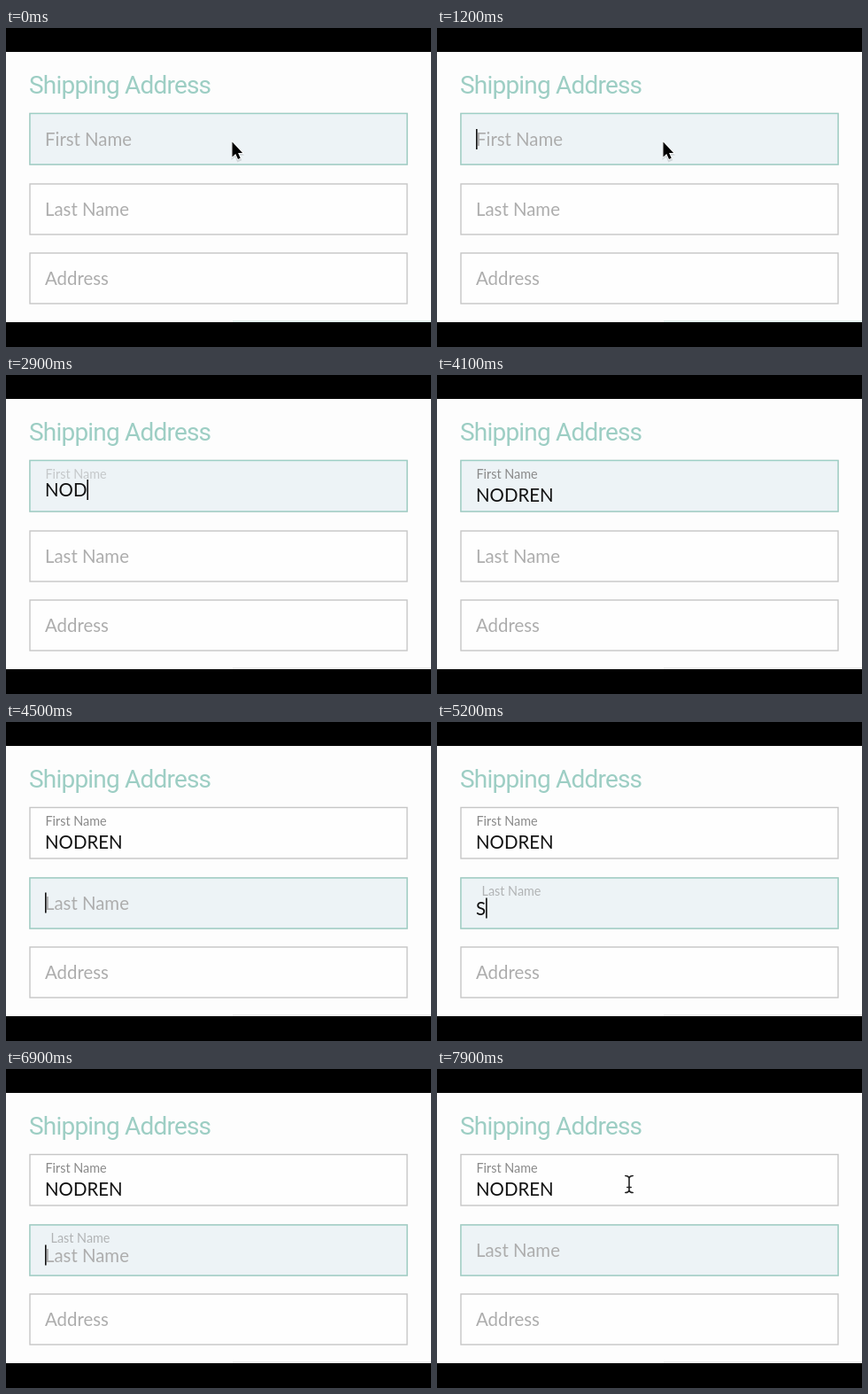
Recreate the animation shown at these times as an HTML page. Size 480x360 px, loop 8000 ms.

```html
<!DOCTYPE html>
<html lang="en">
<head>
<meta charset="utf-8">
<title>Floating labels</title>
<style>
  html, body { margin: 0; width: 100%; height: 100%; overflow: hidden; background: #000; }
  svg { display: block; width: 480px; height: 360px; }
  text { font: 20.4px Lato, sans-serif; white-space: pre; }
  .title { font: 28px Roboto, sans-serif; letter-spacing: -.8px; fill: #9dcec4; }
  .box { fill: #fefefe; stroke: #c6c6c6; stroke-width: 1.4; }
  .active { fill: #edf3f6; stroke: #9dcfc5; stroke-width: 1.4; }
  .hint { fill: #adadad; }
  .value { fill: #111; }
  .label { font-size: 14.4px; fill: #8a8a8a; }
</style>
</head>
<body>
<svg viewBox="0 0 480 360">
  <rect width="480" height="360"/>
  <rect y="27" width="480" height="305" fill="#fdfdfd"/>
  <rect id="edge" x="256" y="330" width="224" height="2"/>
  <text class="title" x="26" y="74">Shipping Address</text>
  <g id="form"></g>
  <rect id="caret" width="1.6" height="23" fill="#111"/>
  <g id="arrow">
    <path d="M254.5 127v20.5l4.2-3.6 2.6 6 5-2.1-2.5-5.6h5.2z" fill="#000" opacity=".12" transform="translate(0 1.5)"/>
    <path d="M255.5 128.5v17l3.8-3.6 2.7 6 2.7-1.2-2.6-5.8h5z" stroke="#fff" stroke-width="1.6" paint-order="stroke"/>
  </g>
  <g id="beam" fill="none" stroke-linecap="round">
    <path id="beamPath" stroke="#fff" stroke-width="3.4"
      d="M212.8 120.5q3.4 0 4.2 2.6q.8-2.6 4.2-2.6M217 123v14M212.8 139.5q3.4 0 4.2-2.6q.8 2.6 4.2 2.6M214.8 133.5h4.4"/>
    <use href="#beamPath"/>
    <path stroke="#222" stroke-width="1.6"
      d="M212.8 120.5q3.4 0 4.2 2.6q.8-2.6 4.2-2.6M217 123v14M212.8 139.5q3.4 0 4.2-2.6q.8 2.6 4.2 2.6M214.8 133.5h4.4"/>
  </g>
</svg>
<script>
const LOOP = 8000, STEP = 100, BLINK = 620, FLOAT = 500, DROP = 10;
const TYPE_AT = 2700, FOCUS_AT = 4400, LETTER_AT = 4900, ERASE_AT = 6700;
const NAME = 'NODREN';
// The caret restarts its blink on each of these moments.
const resets = [-1000, 1100, ...[...NAME].map((_, i) => TYPE_AT + i * 100),
  FOCUS_AT, LETTER_AT, ERASE_AT];

const $ = id => document.getElementById(id);
const clamp = v => Math.max(0, Math.min(1, v));
const ramp = (t, start, span) => clamp((t - start) / span);

function add(tag, cls, attrs, text = '') {
  const el = document.createElementNS('http://www.w3.org/2000/svg', tag);
  el.setAttribute('class', cls);
  for (const key in attrs) el.setAttribute(key, attrs[key]);
  el.textContent = text;
  return $('form').appendChild(el);
}

function makeField(name, y, height, base, labelX) {
  const frame = { x: 27, y, width: 426, height };
  add('rect', 'box', frame);
  return {
    base,
    active: add('rect', 'active', frame),
    hint: add('text', 'hint', { x: 44 }, name),
    value: add('text', 'value', { x: 44 }),
    label: add('text', 'label', { x: labelX, y: base - 16 }, name)
  };
}

const first = makeField('First Name', 96.5, 57.5, 133, 44.5);
const last = makeField('Last Name', 176, 57, 211.5, 50.5);
const address = makeField('Address', 254, 57, 290, 44.5);

function setField(field, text, lift, focus) {
  const y = field.base + lift * DROP;
  field.y = y;
  field.hint.setAttribute('y', y);
  field.value.setAttribute('y', y);
  field.value.textContent = text;
  field.hint.style.opacity = text ? 0 : 1;
  field.label.style.opacity = lift;
  field.active.style.opacity = focus;
}

function draw(t) {
  const shift = ramp(t, FOCUS_AT - STEP, 2 * STEP);
  const typed = t < TYPE_AT ? 0 : Math.floor((t - TYPE_AT) / 100) + 1;
  const letter = t >= LETTER_AT && t < ERASE_AT ? 'S' : '';
  const lift = ramp(t, LETTER_AT, FLOAT) - ramp(t, ERASE_AT, FLOAT);

  setField(first, NAME.slice(0, typed), ramp(t, TYPE_AT, FLOAT), 1 - shift);
  setField(last, letter, lift, shift);
  setField(address, '', 0, 0);

  const field = t < FOCUS_AT ? first : last;
  const width = field.value.textContent ? field.value.getComputedTextLength() : 0;
  const since = t - resets.filter(r => r <= t).pop();
  $('caret').setAttribute('x', 44 + width);
  $('caret').setAttribute('y', field.y - 19);
  $('caret').style.opacity = since % (2 * BLINK) < BLINK ? 1 : 0;

  $('arrow').style.opacity = t < TYPE_AT ? 1 : 0;
  $('beam').style.opacity = t >= 7700 ? 1 : 0;
  $('edge').style.fill = t < TYPE_AT ? '#e2eeec' : '#ececec';
}

const began = performance.now();
function tick() {
  const t = (performance.now() - began) % LOOP;
  draw(Math.floor(t / STEP) * STEP);
  requestAnimationFrame(tick);
}
tick();
</script>
</body>
</html>
```
